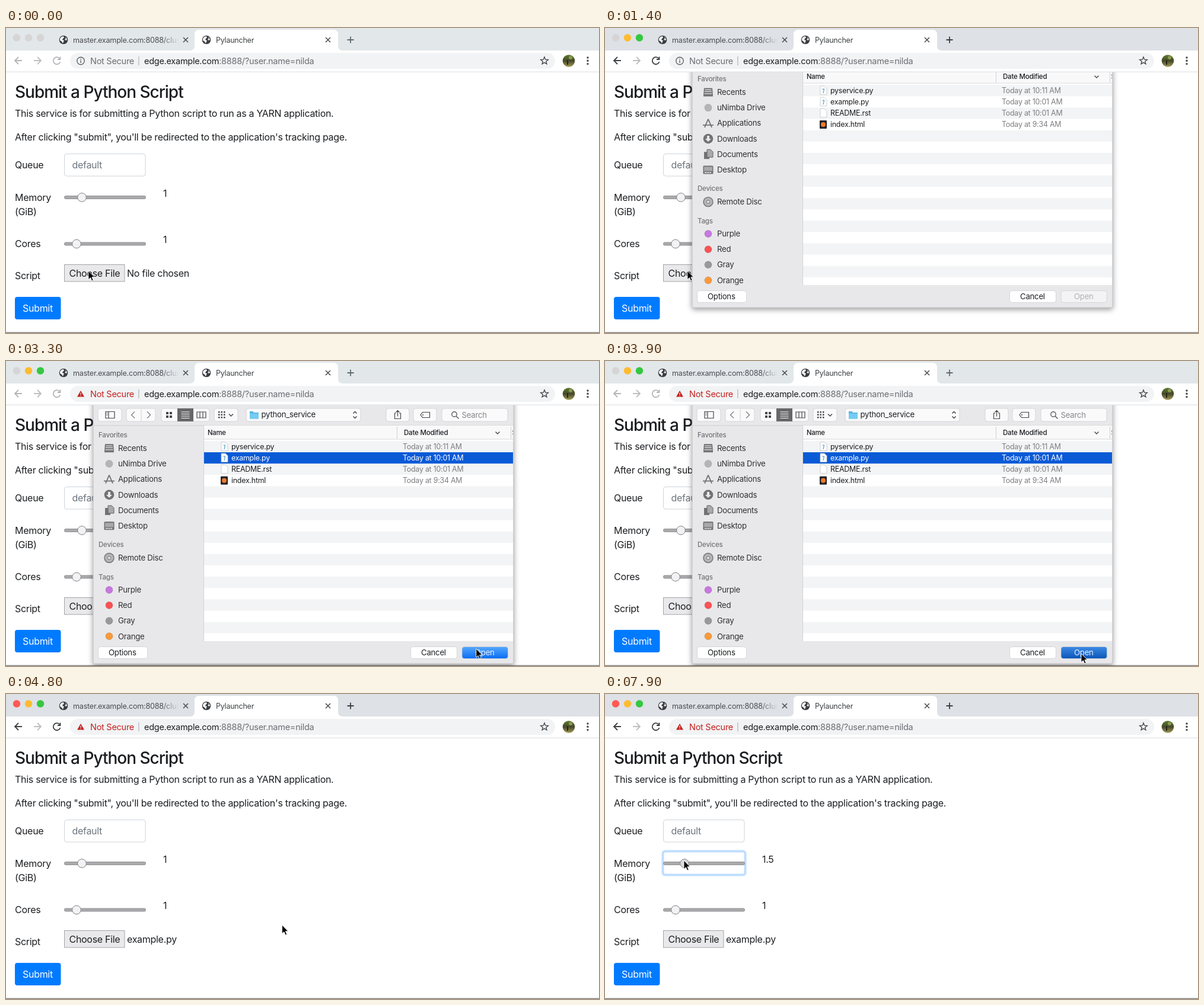
Write an HTML page that moves like this. It is 1000 px wide and 515 px high and loops after 8000 ms.

```html
<!DOCTYPE html>
<html lang="en">
<head>
<meta charset="utf-8">
<title>Submit a Python Script</title>
<style>
  html, body { margin: 0; width: 100%; height: 100%; overflow: hidden; background: #fff; }
  svg { display: block; width: 100vw; height: 100vh; }
  text { font-family: Inter, "Open Sans", sans-serif; letter-spacing: -.0185em; white-space: pre; }
</style>
</head>
<body>
<svg id="stage" viewBox="0 0 1000 515"></svg>
<script>
const LOOP = 8000, STEP = 100, SHEET_TRAVEL = 441;
const INK = '#1c1e21', GRAY = '#6a6e73', ICON = '#47474a', SIDE_ICON = '#727276';
const PANEL = '#e8e8ea', EDGE = '#cfcfd2', DATE = '#7e7e82';

const text = (x, y, s, size = 16, fill = INK, extra = '') =>
  `<text x="${x}" y="${y}" font-size="${size}" fill="${fill}" ${extra}>${s}</text>`;
const rect = (x, y, w, h, fill, r = 0, extra = '') =>
  `<rect x="${x}" y="${y}" width="${w}" height="${h}" rx="${r}" fill="${fill}" ${extra}/>`;
const circle = (x, y, r, fill, extra = '') =>
  `<circle cx="${x}" cy="${y}" r="${r}" fill="${fill}" ${extra}/>`;
const line = (d, stroke = INK, w = 1.5, extra = '') =>
  `<path d="${d}" fill="none" stroke="${stroke}" stroke-width="${w}" ${extra}/>`;
const shape = (d, fill, extra = '') => `<path d="${d}" fill="${fill}" ${extra}/>`;
const group = (id, body, extra = '') => `<g id="${id}" ${extra}>${body}</g>`;
const at = (x, y, body) => `<g transform="translate(${x} ${y})">${body}</g>`;

const defs = `<defs>
  <linearGradient id="blue" x2="0" y2="1"><stop stop-color="#55a8fb"/><stop offset="1" stop-color="#0a6cf5"/></linearGradient>
  <linearGradient id="pressed" x2="0" y2="1"><stop stop-color="#3d8be4"/><stop offset="1" stop-color="#0a55b8"/></linearGradient>
  <linearGradient id="photo" x2="0" y2="1"><stop stop-color="#5d7a2c"/><stop offset=".5" stop-color="#46482a"/><stop offset="1" stop-color="#a39c55"/></linearGradient>
  <linearGradient id="fade"><stop offset=".85" stop-color="#fff"/><stop offset="1" stop-color="#000"/></linearGradient>
  <mask id="tabFade"><rect x="110" y="5" width="181" height="30" fill="url(#fade)"/></mask>
  <clipPath id="below"><rect y="71" width="1000" height="444"/></clipPath>
  <clipPath id="list"><rect x="334" y="109" width="521" height="364"/></clipPath>
  <filter id="shadow" x="-10%" y="-10%" width="120%" height="120%">
    <feDropShadow dx="0" dy="3" stdDeviation="5" flood-color="#000" flood-opacity=".4"/></filter>
</defs>`;

const slider = (id, x, y) =>
  rect(98.5, y - 2.5, 137, 5, '#aaaaac', 2, 'stroke="#868688" stroke-width=".8"') +
  circle(x, y, 7.3, '#f2f2f4', `id="${id}" stroke="#828286"`);

function page() {
  return rect(0, 70, 1000, 445, '#fff') +
    text(15, 118, 'Submit a Python Script', 28, INK, 'font-weight="500" style="letter-spacing:-.036em"') +
    text(15, 150, 'This service is for submitting a Python script to run as a YARN application.') +
    text(15, 190, 'After clicking "submit", you\'ll be redirected to the application\'s tracking page.') +
    text(15, 237, 'Queue') +
    rect(98.5, 212.5, 136.5, 37.5, '#fff', 4, 'stroke="#ced4da"') +
    text(111.5, 237, 'default', 16, '#6c757d') +
    text(15, 291.5, 'Memory') + text(15, 315.5, '(GiB)') +
    rect(97.5, 265.5, 139, 40, '#fff', 4, 'id="focus" stroke="#bfdeff" stroke-width="4"') +
    slider('memThumb', 128, 286) + text(265, 284.5, '1', 16, INK, 'id="memValue"') +
    text(15, 370, 'Cores') + slider('coreThumb', 119, 364.5) + text(265, 363, '1') +
    text(15, 424, 'Script') +
    rect(98.5, 399.5, 101.5, 28.5, '#e9e9eb', 0, 'stroke="#a4a4a6"') +
    text(106.5, 419.5, 'Choose File') + text(204, 419.5, '', 16, INK, 'id="fileName"') +
    rect(15, 454, 77.5, 38, '#007bff', 4) + text(28, 479, 'Submit', 16, '#fff') +
    rect(0, 513.5, 1000, 1.5, '#868688');
}

function globe(x) {
  return at(x, 20, circle(0, 0, 7.3, '#3c3d40') +
    shape('M-6 -2Q-4 -6 0 -6L1 -4L-1 -2L-2 0L1 1L0 3L-1 6Q-3 2 -6 1ZM3 -5Q6 -3 6 0L4 1L2 -1L4 -2Z', '#f2f3f5'));
}

function chrome() {
  const cross = x => line(`M${x - 4} 16l8 8m0 -8l-8 8`, '#4c4e52', 1.6);
  const lights = [18, 38, 58].map((x, i) => circle(x, 16.5, 6.2, '#fff', `id="light${i}"`)).join('');
  const nav = line('M27 55H15M21 49L15 55L21 61', INK, 1.8, 'id="back"') +
    line('M47 55H59M53 49L59 55L53 61', '#bcbec1', 1.8) +
    line('M90.5 51.5A6 6 0 1 0 91.5 57M91.5 48.5V53H87', INK, 1.8, 'id="reload"');
  const star = Array.from({ length: 10 }, (_, i) => {
    const r = i % 2 ? 2.9 : 6.6, a = i * Math.PI / 5;
    return `${908 + r * Math.sin(a)} ${55.5 - r * Math.cos(a)}`;
  }).join('L');
  const info = circle(126, 55.5, 6.2, 'none', 'stroke="#5f6368" stroke-width="1.4"') +
    line('M126 54.5V59M126 51.7V53.2', '#5f6368', 1.4);
  const warning = shape('M126 50L132 60.5H120Z', '#c5221f') + line('M126 53.5V57M126 58V59.2', '#f1f3f4', 1.2);
  return rect(0, 0, 1000, 39, '#e2e7ea', 0, 'id="strip"') + lights +
    globe(97) + `<g mask="url(#tabFade)">${text(113, 24.5, 'master.example.com:8088/clus', 12.6, '#4a4d51')}</g>` + cross(303) +
    shape('M310 38Q318 38 318 30V11Q318 3 326 3H552Q560 3 560 11V30Q560 38 568 38Z', '#fff') +
    globe(338) + text(354, 24.5, 'Pylauncher', 12.5, '#3c4043') + cross(543) +
    line('M575.5 20H586.5M581 14.5V25.5', INK, 1.8, 'id="plus"') +
    rect(0, 38, 1000, 36, '#fff') + rect(0, 73.5, 1000, 1.2, '#dfe1e4') + nav +
    rect(108, 42, 818, 27, '#f1f3f4', 13.5) +
    group('info', info) + group('warning', warning) +
    text(142, 60.5, 'Not Secure', 14.5, GRAY, 'id="security"') +
    rect(223.4, 48, 1, 15, '#a6a9ad') +
    text(233, 60.5, `edge.example.com<tspan fill="${GRAY}">:8888/?user.name=nilda</tspan>`, 14.5) +
    line(`M${star}Z`, ICON, 1.4) +
    circle(949, 55.5, 10.3, 'url(#photo)') + rect(946, 54, 2, 8, '#24241a') + circle(952, 50, 3, '#8c9a52') +
    [50, 55.3, 60.6].map(y => circle(981, y, 1.7, ICON)).join('');
}

function toolbar() {
  const box = (x, w) => rect(x, 80, w, 22, '#fafafb', 4, `stroke="${EDGE}" stroke-width=".8"`);
  const dots = (x, y, cols, rows, gap) => Array.from({ length: cols * rows }, (_, i) =>
    rect(x + i % cols * gap, y + Math.floor(i / cols) * gap, gap - 2, gap - 2, ICON)).join('');
  return box(155, 40) + line('M168 85.5H183V96.5H168ZM173 85.5V96.5M169.5 88H171.5M169.5 91H171.5', ICON, 1.2) +
    box(203, 49) + line('M217 85.5L211.5 91L217 96.5M238 85.5L243.5 91L238 96.5', '#88888c', 1.5) + rect(227.5, 81, 1, 20, EDGE) +
    box(262, 81) + dots(270, 86, 2, 2, 6) + rect(289, 80, 27, 22, '#67676a') +
    line('M295.5 86H309.5M295.5 89.5H309.5M295.5 93H309.5M295.5 96.5H309.5', '#fff', 1.2) +
    line('M322 86H337V96H322ZM327 86V96M332 86V96', ICON, 1.2) +
    box(351, 40) + dots(358, 85, 3, 3, 4.5) + line('M376 89.5L379.5 93L383 89.5', ICON, 1.5) +
    box(405, 193) + shape('M411 85H416.5L418 87H426V97.5H411Z', '#55b5e4') + rect(411, 88.5, 15, 9, '#74cbf2', 1) +
    text(430.5, 95.3, 'python_service', 13.2) +
    line('M585.5 88.5L588.5 85.5L591.5 88.5M585.5 93.5L588.5 96.5L591.5 93.5', ICON, 1.5) +
    box(641, 39) + box(687, 39) +
    group('share', line('M658 88H655.5V97.5H665.5V88H663M660.5 93.5V83.5M657.5 86.5L660.5 83.5L663.5 86.5M699 91L702.5 86.5H714.5V95.5H702.5Z', 'currentColor', 1.2) +
      circle(703, 91, 1, 'currentColor')) +
    box(735, 111) + circle(756, 90, 4.2, 'none', 'stroke="#5e5e62" stroke-width="1.4"') + line('M759 93L763.5 97.5', '#5e5e62', 1.5) +
    text(768.5, 95.5, 'Search', 13.2, '#87878b');
}

function sidebar() {
  const heading = (y, s) => text(156, y, s, 11.5, '#737377', 'font-weight="500"');
  const icons = [
    shape('M-7 -7H7L8 5V7H-8V5Z', SIDE_ICON) + line('M-5.5 -4H5.5M-6 -1H6M-6.5 2.5H6.5', PANEL, 1.2),
    circle(0, 0, 6.5, '#b4b4b8'),
    line('M0 -7L-6 7M0 -7L6 7M-9 3H9', SIDE_ICON, 1.8),
    circle(0, 0, 8.3, SIDE_ICON) + shape('M-2 -5H2V0H5L0 5L-5 0H-2Z', PANEL),
    shape('M-7 -4H2V8H-7Z', SIDE_ICON) + shape('M-2 -8H4L8 -4V5H-2Z', '#a9a9ad', 'stroke="#646468"'),
    rect(-8.5, -7, 17, 14, SIDE_ICON, 1.5) + rect(-7, -5, 14, 7, '#a9a9ad') + line('M-6 4.5H6', PANEL, 2, 'stroke-dasharray="2 1"')
  ];
  const places = ['Recents', 'uNimba Drive', 'Applications', 'Downloads', 'Documents', 'Desktop'];
  const tags = [['Purple', '#c977e0'], ['Red', '#fb5254'], ['Gray', '#98989d'], ['Orange', '#fb9a38']];
  const item = (y, s) => text(189, y + 4.7, s, 13.2, '#303033');
  return heading(129, 'Favorites') +
    places.map((s, i) => at(174, 147.3 + i * 26.2, icons[i]) + item(147.3 + i * 26.2, s)).join('') +
    heading(314, 'Devices') +
    circle(174, 332.5, 8, '#b4b4b8', `stroke="${SIDE_ICON}" stroke-width="1.4"`) +
    circle(174, 332.5, 2.6, PANEL, `stroke="${SIDE_ICON}"`) +
    item(332.5, 'Remote Disc') + heading(368.5, 'Tags') +
    tags.map(([s, c], i) => circle(174, 386.5 + i * 26.1, 6, c, 'stroke="#00000030" stroke-width=".8"') + item(386.5 + i * 26.1, s)).join('');
}

function fileList() {
  const rowH = 19.1, top = 135;
  const files = [['pyservice.py', '10:11'], ['example.py', '10:01'], ['README.rst', '10:01'], ['index.html', '9:34']];
  const stripes = Array.from({ length: 9 }, (_, i) => rect(334, top + i * 2 * rowH, 521, rowH, '#f3f4f5')).join('');
  const rows = files.map(([name, time], i) => {
    const y = top + i * rowH + 14;
    const icon = i === 3
      ? rect(362, y - 11.5, 12, 14, '#24242c', 1) + circle(368, y - 4.5, 4, '#ee7a28')
      : shape(`M363 ${y - 12}H370L374 ${y - 8}V${y + 2.5}H363Z`, '#fff', 'stroke="#c6c6ca" stroke-width=".8"') +
        (i < 2 ? line(`M366.5 ${y - 7}H369.5L368 ${y}`, '#5a9fc0', 1.2) : '');
    return icon + text(380, y, name, 12.4, INK, `id="name${i}"`) +
      text(669, y, `Today at ${time} AM`, 12.4, DATE, `id="date${i}"`);
  }).join('');
  return `<g clip-path="url(#list)">` + rect(334, 109, 521, 364, '#fff') +
    stripes + rect(334, 109, 521, 23, '#f9f9fa') + rect(334, 131.5, 521, 1, '#d8d8da') +
    rect(659, 111, 1, 20, EDGE) + rect(851, 111, 1, 20, EDGE) +
    text(340, 125, 'Name', 11.3, INK, 'font-weight="500"') +
    text(671, 125, 'Date Modified', 11.5, INK, 'font-weight="500"') + text(853.5, 125, 'Size', 11.3) +
    line('M825.5 119.5L829 123L832.5 119.5', ICON, 1.4) +
    rect(334, top + rowH, 521, rowH, '#0a5ad6', 0, 'id="selection"') + rows + '</g>';
}

function sheet() {
  const button = (x, w, id = '') => rect(x, 482.5, w, 20, '#fff', 4, `${id} stroke="${EDGE}" stroke-width=".8"`);
  return group('sheet',
    rect(147, 60, 709, 451, PANEL, 2, 'filter="url(#shadow)" stroke="#b2b2b6" stroke-width=".8"') +
    toolbar() + rect(147, 108.5, 709, 1, EDGE) + rect(333, 109, 1, 364, '#d2d2d5') +
    sidebar() + fileList() +
    button(155.5, 83) + text(173, 497, 'Options', 13.2) +
    button(682.5, 78) + text(700, 497, 'Cancel', 13.2) +
    button(769, 77.5, 'id="open"') + text(791, 497, 'Open', 13.2, '#fff', 'id="openText"'));
}

const stage = document.getElementById('stage');
stage.innerHTML = defs + page() + `<g clip-path="url(#below)">${sheet()}</g>` + chrome() +
  group('cursor', shape('M0 0V14.8L3.4 11.6L5.8 17L8.2 16L5.9 10.7H10.4Z', '#000', 'stroke="#fff" stroke-width=".9"'));

const el = {};
stage.querySelectorAll('[id]').forEach(n => { el[n.id] = n; });
const set = (id, name, value) => el[id].setAttribute(name, value);
const show = (id, on) => set(id, 'visibility', on ? 'visible' : 'hidden');

const clamp = u => Math.min(1, Math.max(0, u));
const ease = u => u < .5 ? 2 * u * u : 1 - 2 * (1 - u) ** 2;
const ramp = (t, from, to) => ease(clamp((t - from) / (to - from)));

// time, x, y of the pointer tip
const pointer = [
  [0, 139, 410], [1400, 139, 410], [1950, 368, 147], [2200, 388, 161], [2500, 388, 161],
  [3400, 803, 494], [4200, 803, 494], [5400, 128, 286],
  [5900, 126, 284], [6500, 126, 284], [7300, 133, 281], [LOOP, 133, 281]
];

function pointerAt(t) {
  const i = Math.max(1, pointer.findIndex(p => p[0] >= t));
  const [t0, x0, y0] = pointer[i - 1], [t1, x1, y1] = pointer[i];
  const u = ramp(t, t0, t1);
  return [x0 + (x1 - x0) * u, y0 + (y1 - y0) * u];
}

function draw(t) {
  const down = ramp(t, 1163, 1463) - ramp(t, 3913, 4213);
  const sheetOpen = t > 1150 && t < 4230;
  const lit = t >= 700;
  const active = (lit && t < 1500) || t >= 4300;
  const edited = t >= 1500, selected = t >= 2300, clicked = t >= 3700;
  const dragging = t >= 5800, raised = t >= 6900;

  set('sheet', 'transform', `translate(0 ${(down - 1) * SHEET_TRAVEL})`);
  show('sheet', sheetOpen);
  set('strip', 'fill', active ? '#dee1e6' : '#e2e7ea');
  ['#ff5a52', '#fdbc30', '#35c840'].forEach((c, i) =>
    set('light' + i, 'fill', lit && (i || (active && !sheetOpen)) ? c : '#d6d4d5'));
  const navColor = active ? '#3c4043' : '#b2b4b8';
  set('back', 'stroke', navColor);
  set('reload', 'stroke', navColor);
  set('plus', 'stroke', active ? '#3c4043' : '#5f6b70');
  show('info', !edited);
  show('warning', edited);
  set('security', 'fill', edited ? '#c5221f' : GRAY);

  show('selection', selected);
  set('name1', 'fill', selected ? '#fff' : INK);
  set('date1', 'fill', selected ? '#fff' : DATE);
  set('share', 'color', selected ? ICON : '#b0b0b4');
  set('open', 'fill', clicked ? 'url(#pressed)' : selected ? 'url(#blue)' : '#f3f3f4');
  set('openText', 'fill', selected ? '#eaf2ff' : '#b2b2b5');

  el.fileName.textContent = t >= 4300 ? 'example.py' : 'No file chosen';
  show('focus', dragging);
  set('memThumb', 'cx', raised ? 134 : 128);
  set('memThumb', 'fill', dragging ? '#dadadd' : '#f2f2f4');
  el.memValue.textContent = raised ? '1.5' : '1';
  set('cursor', 'transform', `translate(${pointerAt(t)})`);
}

const start = performance.now();
function tick() {
  const t = (performance.now() - start) % LOOP;
  draw(Math.floor(t / STEP) * STEP);
  requestAnimationFrame(tick);
}
draw(0);
requestAnimationFrame(tick);
</script>
</body>
</html>
```
